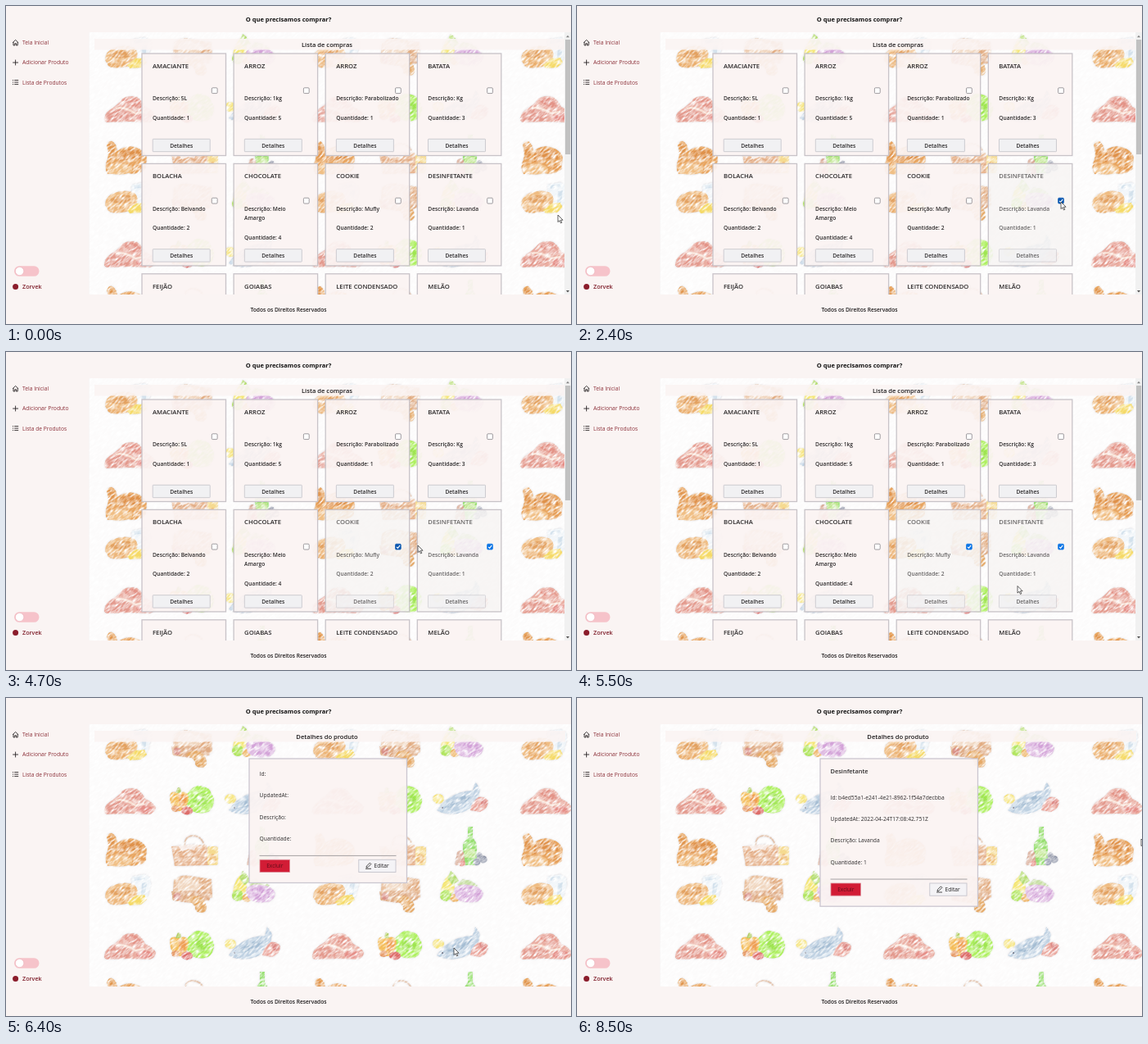
These frames come from a looping animation (690x388 px, 8.6 s). An HTML page:

```html
<!DOCTYPE html>
<html lang="pt-BR">
<head>
<meta charset="utf-8">
<title>Lista de compras</title>
<style>
html, body { margin: 0; width: 100%; height: 100%; overflow: hidden; background: #faf4f3; }
svg { display: block; width: 690px; height: 388px; }
text { font-family: "Open Sans", "Noto Sans", sans-serif; white-space: pre; }
.sticker { filter: drop-shadow(0 0 1.3px #d3d1d5); }
.card.done .fade { opacity: .7; }
.card.done .back { fill: #f7f5f4; fill-opacity: .87; }
.tick { display: none; }
.card.done .tick { display: inline; }
.card.done .box { fill: #0b74e5; stroke: #0b74e5; }
.card.done.hot .box { fill: #0a57b0; stroke: #0a57b0; }
.card.focus .btn { fill: #fdfdfe; stroke: #2f86d6; stroke-width: 1.3; }
.card.focus .action { opacity: 1; }
</style>
</head>
<body>
<svg id="stage" viewBox="0 0 690 388" xmlns="http://www.w3.org/2000/svg">
<defs>
  <clipPath id="mainClip"><rect x="101" y="32" width="589" height="320"/></clipPath>
  <!-- soft white strokes, like wax crayon on rough paper -->
  <filter id="crayon" x="0" y="0" width="100%" height="100%" color-interpolation-filters="sRGB">
    <feTurbulence type="fractalNoise" baseFrequency=".13 .5" numOctaves="2" seed="4"/>
    <feColorMatrix values="0 0 0 0 1  0 0 0 0 1  0 0 0 0 1  2.6 0 0 0 -1"/>
  </filter>
  <pattern id="food" x="101" y="95" width="254" height="177" patternUnits="userSpaceOnUse">
    <!-- meat -->
    <g class="sticker">
      <path d="M19 42q1-8 12-14 7-5 10-10 8-5 18-2 7 5 10 12 8 3 13 10 0 7-8 9l-24-1-27 1q-5-1-4-5z" fill="#eaaea2"/>
      <path d="M23 36q10-7 16-6l16 8-8 7-24 1q-3-4 0-10z" fill="#e39a8e"/>
      <path d="M41 20q8-6 17-2 7 6 9 12-12 1-26-10z" fill="#e39488"/>
      <path d="M33 30q10-3 24 6l11-2" fill="none" stroke="#f7ddd0" stroke-width="2.4"/>
      <ellipse cx="68" cy="41" rx="10" ry="5" fill="#e58f88"/>
    </g>
    <!-- lettuce and peppers -->
    <g class="sticker">
      <path d="M120 29q-2-8 5-12 6-7 14-4 9 1 11 9 5 6 2 13-2 9-10 10-11 2-18-4-5-5-4-12z" fill="#aef060"/>
      <path d="M127 31q2-10 11-11 8 2 8 11-4 8-11 7z" fill="#9fe552"/>
      <path d="M99 25q1-7 8-5l2-5 3 1v4q9-2 10 6-1 12-8 17h-9q-6-9-6-18z" fill="#f4bd5b"/>
      <path d="M110 23q7-2 10 3-1 9-7 14-4-7-3-17z" fill="#ee9f55"/>
      <path d="M106 21l3-7 3 1 1 6z" fill="#b3cf63"/>
      <ellipse cx="120" cy="42.5" rx="7" ry="5" fill="#dd6d6a"/>
      <ellipse cx="106" cy="40" rx="5" ry="4" fill="#e69a67"/>
    </g>
    <!-- fish -->
    <g class="sticker">
      <ellipse cx="173" cy="28" rx="7" ry="6" fill="#f6e583"/>
      <path d="M171 42q8-13 24-20 11-4 20-4l3-11 6 9-2 10q-7 17-26 20-15 2-25-4z" fill="#bfd1e2"/>
      <path d="M180 40q10-14 34-18-6 15-34 18z" fill="#a5bdd3"/>
      <path d="M183 46q16-1 30-14-4 14-30 14z" fill="#dfe9f2"/>
      <circle cx="178" cy="39" r="1" fill="#667"/>
      <path d="M212 42q1-10 10-16 9-1 12 5 0 9-10 13z" fill="#eaa59b"/>
      <path d="M223 27q9 1 10 7l-7 3z" fill="#dc8884"/>
    </g>
    <!-- roast -->
    <g class="sticker">
      <path d="M22 75q2-6 7-5 5 3 6 12 12-9 24-4 11 4 12 13-1 10-5 16-9 4-18 2l-25 1q-5-8 0-18 2-9-1-17z" fill="#e8a560"/>
      <path d="M36 85q12-9 24-4 6 4 5 11-15-2-29 4z" fill="#df914a"/>
      <path d="M24 74q4-4 6 1l2 14-6 4z" fill="#e0954e"/>
      <path d="M22 103q12-9 28-3 5 4 2 8-14 5-28 1z" fill="#f0bf85"/>
      <ellipse cx="63" cy="102" rx="7" ry="5" fill="#e69f59"/>
    </g>
    <!-- picnic basket -->
    <g class="sticker">
      <path d="M117 87q0-14 10-14 12 0 15 15" fill="none" stroke="#e3c3ac" stroke-width="1.8"/>
      <path d="M101 86l43-2 3 25-42 1z" fill="#e8b793"/>
      <path d="M103 93h40m-39 6h41m-40 6h41" stroke="#d99f78" stroke-width=".9"/>
      <path d="M109 85l24-2-4 8-7-2-8 3z" fill="#f5e7e0"/>
      <rect x="145" y="86" width="13" height="23" rx="3" fill="#f5da90"/>
      <ellipse cx="151" cy="101" rx="5" ry="6" fill="#eebd78"/>
    </g>
    <!-- bottle -->
    <g class="sticker">
      <path d="M209 62h6v13l5 8v26h-17V83l6-8z" fill="#98df72"/>
      <rect x="205" y="89" width="13" height="11" fill="#bfe68f"/>
      <path d="M193 109l3-16q4-4 8 0l2 16z" fill="#d8ab97"/>
      <circle cx="223" cy="97" r="3.6" fill="#a0a4b3"/>
      <circle cx="228" cy="102" r="4.6" fill="#8d93a6"/>
      <circle cx="220" cy="105" r="4.4" fill="#9297ad"/>
      <circle cx="202" cy="107" r="3.6" fill="#e3847a"/>
    </g>
    <!-- breakfast -->
    <g class="sticker">
      <path d="M52 123l16-3 7 4 1 9-4 14q-8 5-18 1z" fill="#eff4f8"/>
      <path d="M55 124l12-2 2 4-13 2zm10 7l6-1-2 15-5 1z" fill="#d3e1ec"/>
      <path d="M20 148q0-11 11-15 14-5 25 0 6 6 2 14-4 9-18 10-16 0-20-9z" fill="#efbd84"/>
      <path d="M24 143q9-9 26-7 3 4 0 8-13 4-26-1z" fill="#e3a262"/>
      <path d="M47 154l10-8 11-1 3 6-7 6-14 1z" fill="#f5da68"/>
      <ellipse cx="34" cy="153" rx="11" ry="4.5" fill="#eaae6d"/>
    </g>
    <!-- bread basket -->
    <g class="sticker">
      <path d="M104 127q8-7 20-5l26 4 1 22-14 6-35-3z" fill="#e9c09e"/>
      <path d="M109 131q5-8 16-6l11 7-4 9-23-1z" fill="#f0d6bf"/>
      <path d="M101 141l34-1 16 3-4 9-24 3-20-3z" fill="#dfac86"/>
      <path d="M134 124l15 4v12l-12 1z" fill="#e2ad83"/>
      <path d="M119 152q3-6 12-6 12 3 13 14 0 7-6 7-9 0-8-7-3-6-11-8z" fill="#e5aa69"/>
      <circle cx="108" cy="147" r="4.5" fill="#d99187"/>
    </g>
    <!-- fruit -->
    <g class="sticker">
      <path d="M176 141q2-12 8-19l5-2q4 9 4 19-5 9-15 8z" fill="#f4e675"/>
      <path d="M184 125l4-9 4 3 6 9-8 5z" fill="#b5dd72"/>
      <circle cx="182" cy="146" r="7" fill="#b1e560"/>
      <ellipse cx="193" cy="149" rx="5.5" ry="5" fill="#eeb669"/>
      <path d="M196 133l7-7 10 2 8 6-15 5z" fill="#c9dfa6"/>
      <path d="M192 138q8-7 18-5 14 1 18 10-1 9-10 11-18 2-24-6z" fill="#dfbbe2"/>
      <g fill="#d3a3d8">
        <circle cx="203" cy="140" r="4"/><circle cx="212" cy="139" r="4"/><circle cx="221" cy="142" r="4"/>
        <circle cx="207" cy="148" r="4"/><circle cx="217" cy="149" r="4"/>
      </g>
    </g>
  </pattern>
</defs>
</svg>
<script>
const stage = document.getElementById('stage');
const LOOP = 8600, STEP = 100;
const INK = '#2c2a2b', RED = '#8c3039', PAPER = '#fbf4f3';

const text = (x, y, s, size = 6.65, weight = 600, fill = INK, anchor = 'start') =>
  `<text x="${x}" y="${y}" font-size="${size}" font-weight="${weight}" fill="${fill}" text-anchor="${anchor}">${s}</text>`;
const rect = (x, y, w, h, fill, more = '') =>
  `<rect x="${x}" y="${y}" width="${w}" height="${h}" fill="${fill}" ${more}/>`;
const heading = s =>
  rect(108, 40, 575, 13.5, PAPER, 'fill-opacity=".9"') + text(392, 50, s, 7.6, 600, '#1d1b1c', 'middle');

const items = [
  ['AMACIANTE', ['5L'], 1], ['ARROZ', ['1kg'], 5],
  ['ARROZ', ['Parabolizado'], 1], ['BATATA', ['Kg'], 3],
  ['BOLACHA', ['Belvando'], 2], ['CHOCOLATE', ['Meio', 'Amargo'], 4],
  ['COOKIE', ['Mufly'], 2], ['DESINFETANTE', ['Lavanda'], 1],
  ['FEIJÃO', [''], 1], ['GOIABAS', [''], 1],
  ['LEITE CONDENSADO', [''], 1], ['MELÃO', [''], 1]
];

function card([name, [desc, extra], amount], i) {
  const x = 166 + i % 4 * 112.1, y = 58 + Math.floor(i / 4) * 134.4;
  return `<g class="card" transform="translate(${x} ${y})">
    ${rect(0, 0, 102.5, 124.5, PAPER, 'class="back" fill-opacity=".93" stroke="#c8c3c8" stroke-width="1.3"')}
    <g class="fade">
      ${text(13, 18.1, name, 7.7)}
      ${text(13, 57.2, 'Descrição: ' + desc)}
      ${extra ? text(13, 68.7, extra) : ''}
      ${text(13, extra ? 92.3 : 80.8, 'Quantidade: ' + amount)}
    </g>
    <g class="fade action">
      ${rect(13.2, 104.3, 70, 15.4, '#f1f1f3', 'class="btn" stroke="#c9c8cd" stroke-width=".9" rx=".6"')}
      ${text(48.2, 114.6, 'Detalhes', 6.6, 600, INK, 'middle')}
    </g>
    ${rect(85.3, 41.8, 6.8, 6.8, '#fff', 'class="box" stroke="#77757a" stroke-width=".7" rx="1.2"')}
    <path class="tick" d="M86.8 45.4l1.5 1.6 2.6-3.5" fill="none" stroke="#fff" stroke-width="1.1"/>
  </g>`;
}

const scrollbar = rect(682, 32, 8, 320, '#f1f1f1') + rect(683, 41, 6.2, 140, '#c1c1c1') +
  '<path d="M684 38.2h4l-2-2.4z" fill="#858585"/><path d="M684 347h4l-2 2.4z" fill="#505050"/>';

const labels = ['Id:', 'UpdatedAt:', 'Descrição:', 'Quantidade:'];
const values = ['b4ed55a1-e241-4e21-8962-1f54a7decbba', '2022-04-24T17:08:42.751Z', 'Lavanda', '1'];

function panel(id, loaded) {
  const dy = loaded ? 28.7 : 0;
  const rows = labels.map((l, i) =>
    text(309.6, 95.2 + dy + i * 26.2, loaded ? `${l} ${values[i]}` : l, 6.7, 400)).join('');
  return `<g id="${id}">
    ${rect(297, 74, 192.5, 151.5 + dy, PAPER, 'fill-opacity=".94" stroke="#cbc6d0" stroke-width="1.3"')}
    ${loaded ? text(309.6, 92.4, 'Desinfetante', 7.4) : ''}${rows}
    <g transform="translate(0 ${dy})">
      ${rect(309.5, 191.9, 167, .9, '#9c989b')}
      ${rect(310, 197.3, 36.5, 15.2, '#d21c35', 'stroke="#dc8e99" stroke-width=".8"')}
      ${text(328.3, 207.4, 'Excluir', 6.6, 400, '#5f0d1a', 'middle')}
      ${rect(430.8, 197.3, 45.2, 15.2, '#f4f3f6', 'stroke="#c5c4cc" stroke-width=".9"')}
      <path d="M440 207l.4-1.9 4-4 1.5 1.5-4 4zM439 208.3h7" fill="none" stroke="#222" stroke-width=".8"/>
      ${text(449.6, 207.4, 'Editar', 6.6, 400, '#1d1b1c')}
    </g>
  </g>`;
}

const frame = `
  ${text(345, 19, 'O que precisamos comprar?', 7.55, 700, '#111', 'middle')}
  ${text(345, 373, 'Todos os Direitos Reservados', 6.65, 600, '#1d1b1c', 'middle')}
  <g fill="none" stroke="#2a2526" stroke-width=".9">
    <path d="M8 44.8l3.6-3.4 3.6 3.4M9 44v4h1.8v-2.3h1.6V48h1.8v-4"/>
    <path d="M8.2 69h6.8M11.6 65.6v6.8"/>
    <path d="M10.2 90.6h5m-5 2.5h5m-5 2.5h5M8 90.6h1.1M8 93.1h1.1M8 95.6h1.1"/>
  </g>
  ${['Tela Inicial', 'Adicionar Produto', 'Lista de Produtos']
    .map((s, i) => text(20, 46.9 + i * 24.3, s, 6.7, 400, RED)).join('')}
  ${rect(10, 317.2, 30.5, 12.6, '#f6c3ca', 'rx="6.3"')}
  <circle cx="16.6" cy="323.5" r="5.2" fill="#fff" stroke="#e9aab3" stroke-width=".6"/>
  <circle cx="11.6" cy="342.4" r="3.5" fill="#8b1c2b"/>
  ${text(20, 345, 'Zorvek', 7.2, 600, '#7f1f2b')}`;

stage.insertAdjacentHTML('beforeend', `${rect(0, 0, 690, 388, '#faf4f3')}${frame}
  <g clip-path="url(#mainClip)">
    ${rect(101, 32, 589, 320, '#fcfbfb')}
    ${rect(101, 32, 589, 320, 'url(#food)')}
    ${rect(-10, -190, 800, 760, '#fff', 'filter="url(#crayon)" transform="rotate(-40 395 192)"')}
    ${rect(100.5, 32, .8, 320, '#eee8e8')}
    <g id="list">${heading('Lista de compras')}${items.map(card).join('')}${scrollbar}</g>
    <g id="details">${heading('Detalhes do produto')}${panel('blank', false)}${panel('full', true)}</g>
  </g>
  <g id="cursor" fill="#fff" stroke="#222" stroke-width=".7" stroke-linejoin="round">
    <path id="arrow" d="M0 0v8.6l2-1.9 1.4 3.2 1.4-.6-1.4-3.1h2.7z"/>
    <path id="hand" d="M1.2 1q0-1 .9-1t.9 1v3.3l.4-.6 1.2.4.4.4 1.1.3.4.5q1.5 0 1.5 1.4 0 2.4-1.2 3.9v1H2.7v-1L-.6 7q-.5-1.3.6-1.2l1.2 1z"/>
  </g>`);

const $ = id => document.getElementById(id);
const [list, details, blank, full, cursor, arrow, hand] =
  ['list', 'details', 'blank', 'full', 'cursor', 'arrow', 'hand'].map($);
const cards = document.querySelectorAll('.card');
const cookie = cards[6], cleaner = cards[7];

// time, x, y of the pointer tip
const path = [
  [0, 674, 255], [300, 660, 253], [700, 608, 242], [1000, 591, 239], [2500, 591, 239],
  [2700, 573, 238], [3100, 491, 238], [3300, 478, 238], [4300, 478, 238], [4700, 503, 236],
  [5100, 535, 279], [5400, 535, 279], [5800, 547, 305], [6500, 547, 305],
  [7500, 616.5, 141.5], [8000, 616.5, 141.5], [8500, 689, 172], [LOOP, 689, 172]
];

function pointAt(t) {
  const i = path.findIndex(p => p[0] > t);
  const [t0, x0, y0] = path[i - 1], [t1, x1, y1] = path[i];
  const k = (t - t0) / (t1 - t0);
  return [x0 + (x1 - x0) * k, y0 + (y1 - y0) * k];
}

const show = (el, on) => { el.style.display = on ? 'inline' : 'none'; };

function draw(t) {
  const onList = t < 6400, onButton = t >= 5700 && onList;
  show(list, onList);
  show(details, !onList);
  show(blank, t < 7800);
  show(full, t >= 7800);
  cleaner.classList.toggle('done', t >= 1300);
  cleaner.classList.toggle('hot', t < 2600);
  cleaner.classList.toggle('focus', t >= 6200);
  cookie.classList.toggle('done', t >= 3600);
  cookie.classList.toggle('hot', t < 4800);
  show(arrow, !onButton);
  show(hand, onButton);
  cursor.setAttribute('transform', `translate(${pointAt(t)})`);
}

const start = performance.now();
function tick() {
  const t = (performance.now() - start) % LOOP;
  draw(Math.floor(t / STEP) * STEP);
  requestAnimationFrame(tick);
}
tick();
</script>
</body>
</html>
```
